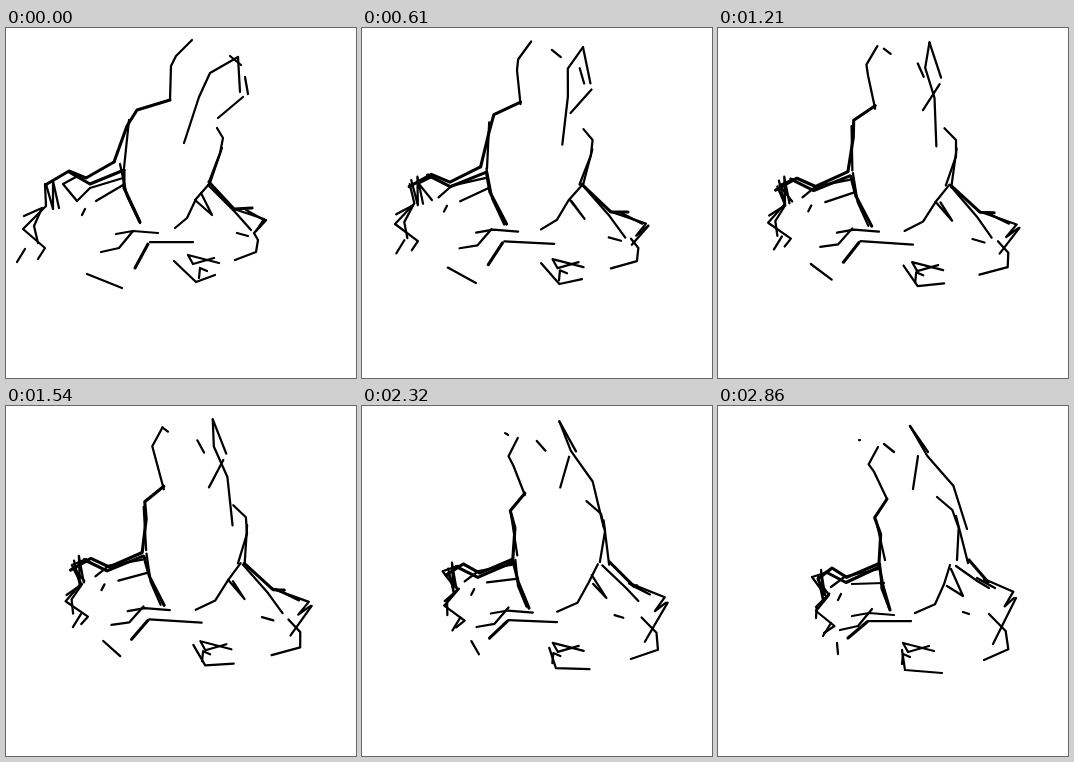
Write an HTML page that moves like this. It is 350 by 350 pixels and loops after 2.89 s.

```html
<!DOCTYPE html>
<html lang="en">
<head>
<meta charset="utf-8">
<title>Turning line figure</title>
<style>
  html, body { margin: 0; width: 100%; height: 100%; overflow: hidden; background: #fff; }
  svg { display: block; width: 100vw; height: 100vh; }
  polyline { fill: none; stroke: #000; stroke-width: 2.25; stroke-linecap: round; stroke-linejoin: round; }
  .bold { stroke-width: 3.1; }
</style>
</head>
<body>
<svg id="stage" viewBox="0 0 350 350"></svg>
<script>
const LOOP = 2890, HOLD = 70, STEP = 30, LAST = 94;
const stage = document.getElementById('stage');
const lines = [];

const parse = text => text.split(' ').map(p => p.split(',').map(Number));
const clamp = (v, lo, hi) => Math.min(hi, Math.max(lo, v));

// Vector at fraction f along an evenly spaced list of vectors.
function along(list, f) {
  const pos = f * (list.length - 1);
  const i = Math.min(Math.floor(pos), list.length - 1);
  const a = list[i], b = list[i + 1] || a;
  return a.map((v, k) => v + (b[k] - v) * (pos - i));
}

// The turn bows each path outwards on the right and slightly up on the left.
const turnBow = ([x]) => [clamp(10 + (x - 203) * 0.28, -4, 26), (x - 160) * 0.08];

// Start points, how far they travel in one loop, and how far the path bows midway.
function line(points, travel, bow) {
  const el = document.createElementNS('http://www.w3.org/2000/svg', 'polyline');
  stage.append(el);
  const start = parse(points), move = parse(travel), bend = bow && parse(bow);
  const joints = start.map((p, i) => {
    const f = i / (start.length - 1);
    return { p, move: along(move, f), bow: bend ? along(bend, f) : turnBow(p) };
  });
  lines.push({ el, joints });
  return el;
}
const bold = (...args) => line(...args).classList.add('bold');

// Head and ears
line('186,12 170,28 165,38 164,72', '-26,29 -16,31 5,21', '-16,-6 -9,0');
line('224,28 235,37', '-83,6 -93,-3', '-24,-10');
line('239,49 242,66', '-73,-11 -66,-20', '-9,-9');
line('178,115 193,69 204,45 232,29', '71,8 28,12 -40,-9', '11,0 -4,-11');
line('232,29 234,64', '-40,-9 -24,-18', '-4,-11 -1,-7');
line('237,69 212,90', '-37,-19 -17,-7', '0,-5');

// Right side, arm and hand
line('211,100 217,110 214,125 203,154', '8,-9 36,0');
line('216,120 204,155', '22,-10 46,2');
line('204,155 190,171 181,190 169,200', '28,4 40,9 28,7', '16,0 6,0');
bold('203,154 228,181 246,180', '48,0 42,-5 20,-5');
line('202,157 229,184 245,202', '36,3 26,-20', '16,0 18,16');
line('228,181 258,191 250,203 260,192', '38,-8 36,0');
line('260,192 248,205', '38,0 27,33');
line('248,205 252,212 250,224 229,232', '23,3 42,18 37,22');
line('189,172 206,187 195,165', '40,8 38,-2', '17,-1 7,10');
line('243,184 258,192 240,182', '19,-10');
line('231,205 242,208', '14,1 9,0');

// Left side
bold('164,72 131,82 121,98 108,134', '5,21 36,34 53,23', '-9,-3 0,0');
line('123,92 118,140', '35,22 49,14');
bold('118,142 118,160 134,194', '43,16 47,20 38,10', '-3,0 4,0');
line('114,136 121,168 134,195', '48,22 37,7', '1,0');

// Left arm
bold('108,134 80,150 63,143 41,156', '52,24 47,20 59,17', '0,0 -8,-1');
bold('118,142 84,156 63,144', '43,19 45,22', '-4,-2 -9,-2');
line('117,150 84,160 71,173', '44,13 42,8');
line('71,173 57,156 70,149', '34,13 40,17', '-11,-5');
line('117,157 90,173', '49,20 44,5', '-1,-1');
line('79,181 76,187', '44,7');

// Left hand
line('39,156 40,178 17,201 39,220 32,231', '61,18 81,4 74,-4', '-5,-5 4,-11');
line('40,156 47,181 47,153 53,180', '60,15 54,9');
line('18,188 36,180 28,198 32,215', '80,13 66,-3', '0,-6');
line('19,221 11,234', '94,-4', '6,-11');

// Legs and feet
line('110,206 127,203 152,205', '24,4', '-1,-3');
line('127,203 113,220 95,224', '27,0');
line('144,214 187,214', '6,1');
bold('142,216 129,240', '7,0 1,-8');
line('81,246 116,260', '38,-9 4,-12');
line('168,233 190,254 209,247', '16,11 -3,10 15,20', '11,0');
line('213,235 182,227 187,236 208,230', '3,10', '11,3');
line('193,250 194,240 201,243', '-9,8', '8,1');

function draw(now) {
  const t = now % LOOP;
  const step = t < HOLD ? 0 : Math.floor((t - HOLD) / STEP) + 1;
  const s = Math.min(step / LAST, 1);
  const e = s ** 0.9;
  const arch = 4 * e * (1 - e);
  for (const { el, joints } of lines) {
    const at = j => j.p.map((v, k) => (v + j.move[k] * s + j.bow[k] * arch).toFixed(2));
    el.setAttribute('points', joints.map(at).join(' '));
  }
}

function tick() {
  draw(performance.now());
  requestAnimationFrame(tick);
}
tick();
</script>
</body>
</html>
```
